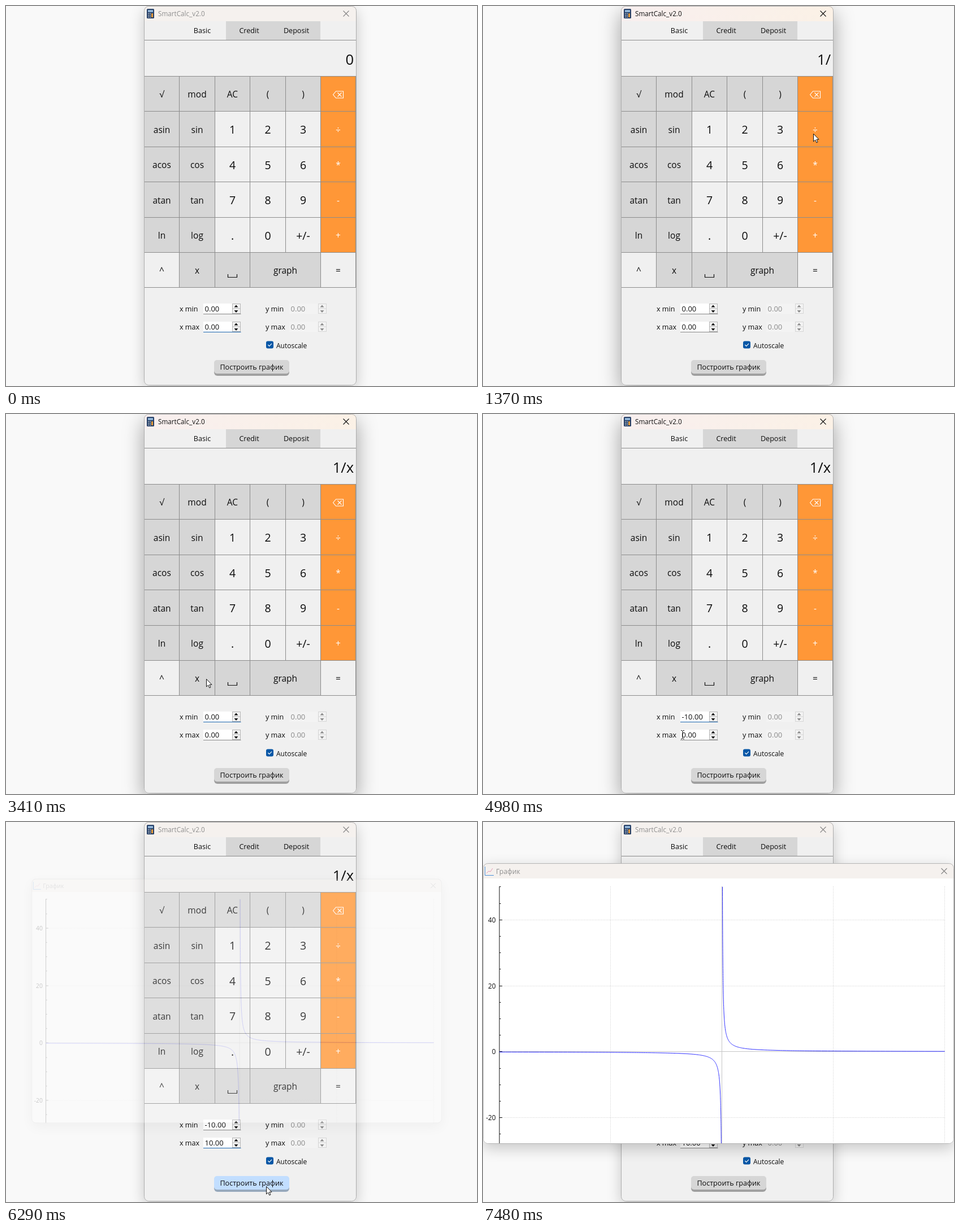
An HTML page that plays this animation: 833 px wide and 673 px high, repeating every 7550 ms.

```html
<!DOCTYPE html>
<html lang="ru">
<head>
<meta charset="utf-8">
<title>SmartCalc</title>
<style>
  html, body { margin: 0; width: 100%; height: 100%; overflow: hidden; background: #f9f9f9; }
  #stage { position: relative; width: 833px; height: 673px; overflow: hidden; }
  svg, #graph { position: absolute; left: 0; top: 0; width: 833px; height: 673px; }
  text { font-family: "Open Sans", "Noto Sans", sans-serif; font-size: 12.6px; fill: #0c0c0c; white-space: pre; }
  .mid { text-anchor: middle; }
  .end { text-anchor: end; }
  .line { fill: none; stroke: #8c8c8c; }
  .shadow { position: absolute; border-radius: 8px; box-shadow: 0 8px 26px rgba(0,0,0,.2); }
  .active .shadow { box-shadow: 0 12px 36px rgba(0,0,0,.36); }
  #mainShadow { left: 244px; top: 0; width: 376px; height: 672px; }
  #graphShadow { left: 0; top: 73px; width: 833px; height: 497px; }
  #graph { transform-origin: 416.5px 321.5px; }
  .caption { fill: #8f8f8f; }
  .close { fill: none; stroke: #858585; stroke-width: 1.1; }
  .bar { fill: #f5f1ee; }
  .active .caption { fill: #111; }
  .active .close { stroke: #111; }
  .active .bar { fill: url(#warm); }
  .underline { stroke: #868686; }
  .focus .underline { stroke: #1a66b0; }
  #plot .base { fill: #a0a0a0; }
  #plot .face { fill: #d6d6d6; }
  #plot.hover .base { fill: #97a9bd; }
  #plot.hover .face { fill: #c2deff; }
</style>
</head>
<body>
<div id="stage">
  <div id="main">
    <div class="shadow" id="mainShadow"></div>
    <svg viewBox="0 0 833 673">
      <defs>
        <linearGradient id="warm">
          <stop offset="0" stop-color="#f8efef"/><stop offset="1" stop-color="#fbf1e6"/>
        </linearGradient>
        <clipPath id="mainClip"><rect x="244" y="0" width="376" height="672" rx="8"/></clipPath>
      </defs>
      <g clip-path="url(#mainClip)">
        <rect x="244" width="376" height="672" fill="#f0f0f0"/>
        <rect class="bar" x="244" width="376" height="27"/>
        <rect x="389" y="27" width="167" height="33" fill="#d6d6d6"/>
        <path class="line" d="M244 60.5H620"/>
        <g id="keys"></g>
      </g>
      <rect class="line" x="244.5" y=".5" width="375" height="671" rx="8" style="stroke:#adadad"/>
      <rect x="249" y="5" width="13" height="17" rx="1.5" fill="#263f66"/>
      <path d="M251 7h9v4h-9z" fill="#8fb3d6"/>
      <path d="M251 13.5h5M251 16.5h5M251 19.5h5" stroke="#b9c4d4" stroke-width="1.6" stroke-dasharray="2 1"/>
      <path d="M257 13h3v7h-3z" fill="#e39a3c"/>
      <text class="caption" x="269" y="18" style="font-size:11.7px">SmartCalc_v2.0</text>
      <path class="close" d="M596.5 8.5l10 10m0-10l-10 10"/>
      <text class="mid" x="347" y="48">Basic</text>
      <text class="mid" x="430" y="48">Credit</text>
      <text class="mid" x="513.5" y="48">Deposit</text>
      <text class="end" id="display" x="615" y="104" style="font-size:25.5px"></text>
      <g id="fields"></g>
      <rect x="460" y="593.5" width="13" height="13" rx="3" fill="#0757a6"/>
      <path d="M463.3 600l2.4 2.5 4.3-4.6" fill="none" stroke="#fff" stroke-width="1.1"/>
      <text x="478" y="605.5" style="font-size:12px">Autoscale</text>
      <g id="plot">
        <rect class="base" x="368" y="628" width="133" height="27" rx="6"/>
        <rect class="face" x="368" y="627" width="133" height="24" rx="5"/>
        <text class="mid" x="434.5" y="644">Построить график</text>
      </g>
    </svg>
  </div>
  <div id="graph">
    <div class="shadow" id="graphShadow"></div>
    <svg viewBox="0 0 833 673">
      <clipPath id="graphClip"><rect y="73" width="833" height="497" rx="8"/></clipPath>
      <g clip-path="url(#graphClip)">
        <rect y="73" width="833" height="497" fill="#fff"/>
        <rect class="bar" y="73" width="833" height="27"/>
        <g id="chart"></g>
      </g>
      <rect class="line" x=".5" y="73.5" width="832" height="496" rx="8" style="stroke:#b5b5b5"/>
      <path d="M3.5 79v15.5H19" fill="none" stroke="#4a90d9"/>
      <path d="M6 91l4-4 3 1 4-6" fill="none" stroke="#e59ab5"/>
      <text class="caption" x="23" y="91.5" style="font-size:12.2px">График</text>
      <path class="close" d="M810.5 82l10 10m0-10l-10 10"/>
    </svg>
  </div>
  <svg viewBox="0 0 833 673">
    <g id="cursor">
      <path id="arrow" d="M.5 .5V14l3.2-2.9 2.1 4.9 2.2-1-2.1-4.7H10z" fill="#fff" stroke="#111"/>
      <path id="beam" d="M-3-7.500H-1L0-6.500 1-7.500H3M0-6.500V6.500M-3 7.500H-1L0 6.500 1 7.500H3" fill="none" stroke="#111"/>
    </g>
  </svg>
</div>
<script>
const LOOP = 7550;
const $ = id => document.getElementById(id);

function buildKeys() {
  const rows = ['√ mod AC ( ) ⌫', 'asin sin 1 2 3 ÷', 'acos cos 4 5 6 *',
                'atan tan 7 8 9 -', 'ln log . 0 +/- +', '^ x ⎵ graph =']
    .map(row => row.split(' '));
  const edgeX = i => Math.round(244 + 62.4 * i) + .5;
  const edgeY = i => Math.round(124 + 62.4 * i) + .5;
  const icons = {
    '⌫': '<path d="M578.500 157l5-6h13v12h-13zM586.500 153.500l7 7m0-7l-7 7" fill="none" stroke="#fff" stroke-width="1.100"/>',
    '⎵': '<path d="M392.500 475v5.500h16V475" fill="none" stroke="#111" stroke-width="1.200"/>'
  };
  let html = '';
  rows.forEach((row, r) => {
    let col = 0;
    for (const label of row) {
      const span = label === 'graph' ? 2 : 1;
      const x = edgeX(col), y = edgeY(r), w = edgeX(col + span) - x, h = edgeY(r + 1) - y;
      const big = /^(\d|\.|\+\/-)$/.test(label);
      const orange = col === 5 && r < 5;
      const fill = orange ? '#ff9737' : big || label === '^' || label === '=' ? '#f0f0f0' : '#d6d6d6';
      const size = big ? 19.5 : 15.5;
      html += `<rect x="${x}" y="${y}" width="${w}" height="${h}" fill="${fill}" stroke="#8c8c8c"/>`;
      html += icons[label] || `<text class="mid" x="${x + w / 2}" y="${y + h / 2 + (big ? 8 : 6.5)}"
        style="font-size:${size}px;${orange ? 'fill:#fff' : ''}">${label}</text>`;
      col += span;
    }
  });
  $('keys').innerHTML = html;
}

function field(id, label, x, y, enabled) {
  const ink = enabled ? '#111' : '#8a8a8a';
  const cx = x + 58;
  return `<text x="${x - 42}" y="${y + 4.5}">${label}</text>
    <g id="${id}">
      <rect x="${x}" y="${y - 9}" width="66" height="18.500" fill="${enabled ? '#fff' : '#f3f3f3'}"/>
      <rect x="${x + 51.5}" y="${y - 8.5}" width="14" height="17" fill="#f3f3f3" stroke="${enabled ? '#b5b5b5' : '#d5d5d5'}"/>
      <path d="M${x + 51} ${y}h15" stroke="${enabled ? '#b5b5b5' : '#d5d5d5'}"/>
      <path d="M${cx - 3.5} ${y - 2.5}l3.500-4 3.500 4zM${cx - 3.5} ${y + 3}l3.500 4 3.500-4z" fill="${ink}"/>
      ${enabled ? `<path class="underline" d="M${x} ${y + 9.5}h66.500"/>` : ''}
      <text class="value" x="${x + 2.5}" y="${y + 4.5}" style="font-size:13px;fill:${ink}">0.00</text>
    </g>`;
}

function buildChart() {
  const px = x => 422.75 + 39.4 * x;
  const py = y => 406.8 - 5.84 * y;
  const snap = v => Math.floor(v) + .5;
  let grid = '', ticks = '', labels = '';
  for (const x of [-5, 5, 10]) grid += `M${snap(px(x))} 114V570`;
  for (let y = -25; y <= 50; y += 5) {
    const major = y % 20 === 0, row = snap(py(y));
    ticks += `M29 ${row}h${major ? 5 : 2.5}`;
    if (!major) continue;
    if (y) grid += `M29 ${row}H817`;
    labels += `<text class="end" x="22.500" y="${row + 4.5}" style="font-size:11.800px">${y}</text>`;
  }
  const branch = (from, to) => {
    const points = [];
    for (let i = 0; i <= 200; i++) {
      const x = from * (to / from) ** (i / 200);
      points.push(px(x).toFixed(2) + ' ' + py(1 / x).toFixed(2));
    }
    return 'M' + points.join('L');
  };
  $('chart').innerHTML =
    `<path d="${grid}" stroke="#cfcfcf" stroke-dasharray="1 1.500"/>
     <path d="M29 406.500H817M422.500 114V570" stroke="#c6c6c6"/>
     <path d="M29 114V570${ticks}" stroke="#111"/>${labels}
     <path d="${branch(-10, -1 / 28)}${branch(1 / 50, 10)}" fill="none" stroke="#2a2aff"/>`;
}

// Last entry [time, ...values] already reached at t
const at = (track, t) => track.findLast(entry => entry[0] <= t);

const pointerPath = [
  [70, 765, 640], [650, 398, 225], [880, 398, 225], [1180, 584, 226], [1400, 584, 226],
  [1800, 350, 472], [2050, 350, 472], [2380, 352, 532], [2800, 352, 532], [3000, 338, 534],
  [3350, 354, 469], [4150, 354, 469], [4700, 353, 568], [5280, 353, 568],
  [5540, 452, 651], [5620, 460, 645], [6850, 460, 645], [7150, 712, 672]
];
const displayText = [[0, '0'], [740, '1'], [1200, '1/'], [1930, '1/x']];
const minText = [[0, '0.00'], [3630, '-0.00'], [3770, '-10.00']];
const maxText = [[0, '0.00'], [5190, '10.00']];
const focused = [[0, 'max'], [740, ''], [2470, 'min'], [5040, 'max'], [7480, '']];
// time, opacity, scale, x, y
const opening = [
  [0, 0, .85, -9, -5], [6290, .2, .871, -8.5, -4.5],
  [6350, .7, .96, -2.5, -1.4], [6410, .95, .993, -.5, -.3], [6480, 1, 1, 0, 0]
];

function pointerAt(t) {
  const i = pointerPath.findLastIndex(p => p[0] <= t);
  if (i < 0 || i === pointerPath.length - 1) return null;
  const [t0, x0, y0] = pointerPath[i], [t1, x1, y1] = pointerPath[i + 1];
  const u = (t - t0) / (t1 - t0), k = u * u * (3 - 2 * u);
  return [x0 + (x1 - x0) * k, y0 + (y1 - y0) * k];
}

function render(t) {
  $('display').textContent = at(displayText, t)[1];
  minValue.textContent = at(minText, t)[1];
  maxValue.textContent = at(maxText, t)[1];
  for (const name of ['min', 'max']) $(name).classList.toggle('focus', at(focused, t)[1] === name);
  $('main').classList.toggle('active', t >= 740 && t < 6220);
  $('graph').classList.toggle('active', t >= 6350 && t < 7480);

  const [, opacity, scale, dx, dy] = at(opening, t);
  $('graph').style.opacity = opacity;
  $('graph').style.transform = `translate(${dx}px, ${dy}px) scale(${scale})`;

  const pointer = pointerAt(t);
  $('cursor').style.display = pointer ? '' : 'none';
  const [x, y] = pointer || [0, 0];
  const inside = (left, top, right, bottom) => x >= left && x <= right && y >= top && y <= bottom;
  const overField = inside(349, 527, 399, 546) || inside(349, 559, 399, 578);
  $('cursor').setAttribute('transform', `translate(${x} ${y})`);
  $('arrow').style.display = overField ? 'none' : '';
  $('beam').style.display = overField ? '' : 'none';
  $('plot').classList.toggle('hover', inside(368, 627, 501, 655));
}

buildKeys();
$('fields').innerHTML = field('min', 'x min', 349, 536, true) + field('max', 'x max', 349, 568, true)
  + field('yMin', 'y min', 501, 536, false) + field('yMax', 'y max', 501, 568, false);
buildChart();
const minValue = $('min').querySelector('.value');
const maxValue = $('max').querySelector('.value');

const start = performance.now();
function tick() {
  render((performance.now() - start) % LOOP);
  requestAnimationFrame(tick);
}
tick();
</script>
</body>
</html>
```
